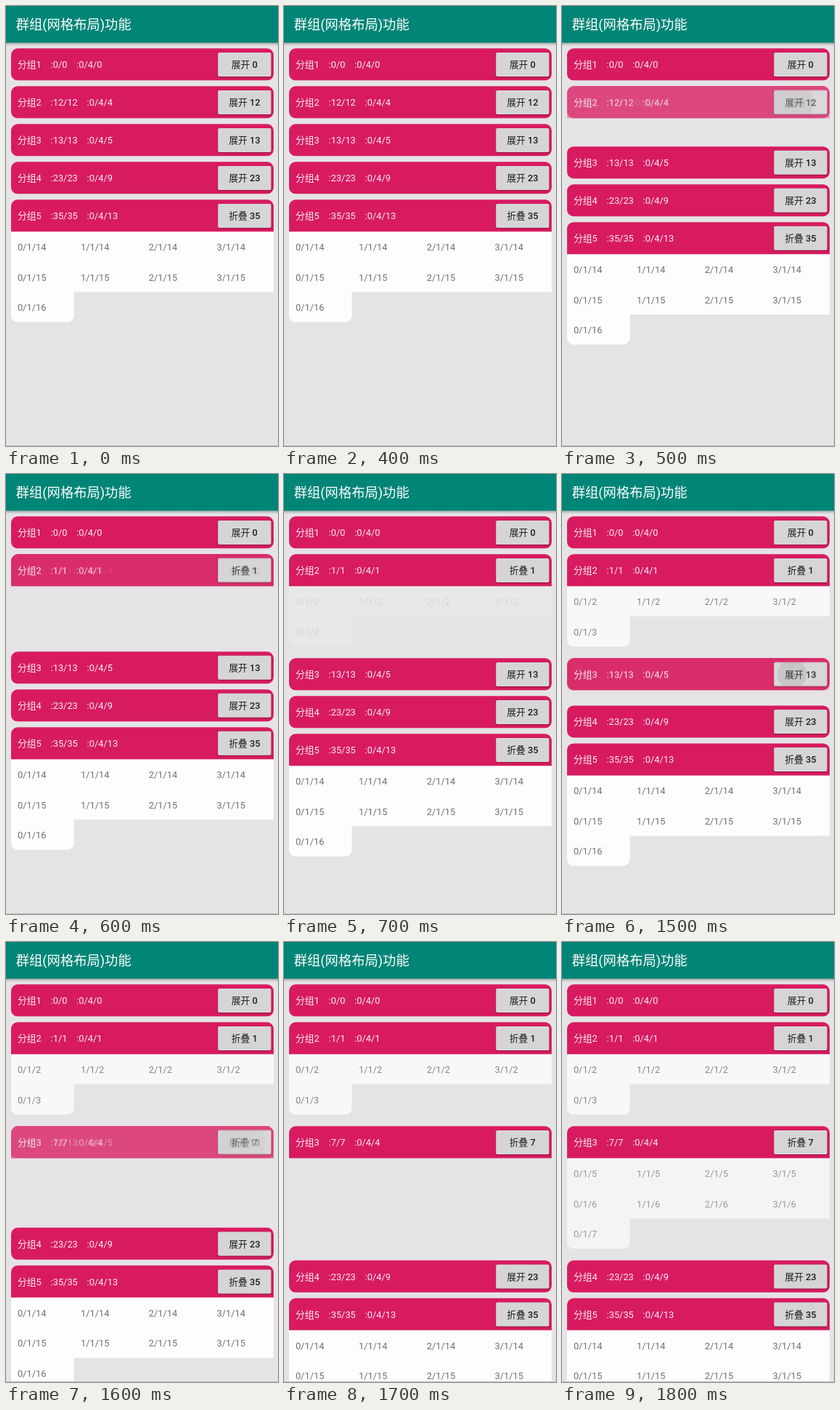
Write an HTML page with a canvas that moves like this. It is 375 by 605 pixels and loops after 2.1 s.

```html
<!DOCTYPE html>
<html lang="zh-CN">
<head>
<meta charset="utf-8">
<title>群组</title>
<style>
  html, body { margin: 0; width: 100%; height: 100%; overflow: hidden; background: #e5e3e5; }
  canvas { display: block; width: 375px; height: 605px; }
</style>
</head>
<body>
<canvas id="stage"></canvas>
<script>
const W = 375, H = 605, LOOP = 2100, STEP = 100;
const FONT = 'Roboto, "Noto Sans CJK SC", "Noto Sans CJK", sans-serif';
const LEFT = 7, RIGHT = 369, HEAD = 44, ROW = 41.5, PITCH = 52, RADIUS = 9;
const FIRST_TOP = 58.3, TEXT_SIZE = 12.85;
const BG = '#e5e3e5', PINK = '#d81b60', CELL = '#fdfdfd';

// Moves and cross-fades take 250 ms, new rows then fade in.
const MOVE = 250, FADE_DELAY = 265, FADE = 120, FADE_MAX = 0.84;
const OPEN_A = 401, OPEN_B = 1449;

const scale = window.devicePixelRatio || 1;

function makeContext(canvas, w, h) {
  canvas.width = Math.round(w * scale);
  canvas.height = Math.round(h * scale);
  const c = canvas.getContext('2d');
  c.scale(scale, scale);
  return c;
}

const ctx = makeContext(document.getElementById('stage'), W, H);
const layer = makeContext(document.createElement('canvas'), W, HEAD + 2);

function ease(x) {
  const p = Math.min(1, Math.max(0, x));
  return 0.5 - Math.cos(p * Math.PI) / 2;
}

function box(c, x, y, w, h, radii, fill) {
  c.beginPath();
  c.roundRect(x, y, w, h, radii);
  c.fillStyle = fill;
  c.fill();
}

function text(c, str, x, y, size, fill, weight = 400) {
  c.font = `${weight} ${size}px ${FONT}`;
  c.fillStyle = fill;
  c.fillText(str, x, y);
  return c.measureText(str).width;
}

function drawButton(c, y, word, count, rippleAge) {
  const x = 292.2, top = y + 5.6, w = 73.3, h = 33;
  c.save();
  c.shadowColor = 'rgba(0,0,0,0.35)';
  c.shadowBlur = 2 * scale;
  c.shadowOffsetY = scale;
  box(c, x, top, w, h, 2, '#d6d5d6');
  c.restore();
  if (rippleAge > 0) {
    c.save();
    c.beginPath();
    c.rect(x, top, w, h);
    c.clip();
    c.fillStyle = 'rgba(0,0,0,0.08)';
    c.beginPath();
    c.arc(317, y + 22, 10 + rippleAge * 0.2, 0, Math.PI * 2);
    c.fill();
    c.restore();
  }
  const size = 12.8, number = ' ' + count, ink = '#1e1e1e';
  c.font = `400 ${size}px ${FONT}`;
  const wordWidth = c.measureText(word).width;
  c.font = `500 ${size}px ${FONT}`;
  const start = x + (w - wordWidth - c.measureText(number).width) / 2;
  text(c, word, start, y + 27, size, ink);
  text(c, number, start + wordWidth, y + 27, size, ink, 500);
}

function drawHeader(c, y, name, count, range, open, rippleAge = 0) {
  const radii = open ? [RADIUS, RADIUS, 0, 0] : RADIUS;
  box(c, LEFT, y, RIGHT - LEFT, HEAD, radii, PINK);
  const label = `${name}    :${count}/${count}    :${range}`;
  text(c, label, 15.9, y + 26.9, TEXT_SIZE, '#fbeef3');
  drawButton(c, y, open ? '折叠' : '展开', count, rippleAge);
}

function fadedHeader(y, alpha, ...args) {
  if (alpha <= 0) return;
  layer.clearRect(0, 0, W, HEAD + 2);
  drawHeader(layer, 0, ...args);
  ctx.globalAlpha = alpha;
  ctx.drawImage(layer.canvas, 0, y, W, HEAD + 2);
  ctx.globalAlpha = 1;
}

// The closed header lies over the open one while they cross-fade.
function swapHeader(y, p, name, before, after, age) {
  if (p === 0) return drawHeader(ctx, y, name, ...before, false);
  if (p === 1) return drawHeader(ctx, y, name, ...after, true);
  fadedHeader(y, p, name, ...after, true);
  fadedHeader(y, 1 - p, name, ...before, false, age);
}

// Full rows of four cells, then one last cell.
function drawRows(y, first, fullRows, alpha = 1) {
  if (alpha <= 0) return;
  ctx.globalAlpha = alpha;
  const bodyHeight = fullRows * ROW;
  ctx.beginPath();
  ctx.rect(LEFT, y, RIGHT - LEFT, bodyHeight);
  ctx.roundRect(LEFT, y + bodyHeight, 86.6, ROW, [0, 0, RADIUS, RADIUS]);
  ctx.fillStyle = CELL;
  ctx.fill();
  for (let r = 0; r <= fullRows; r++) {
    const columns = r < fullRows ? 4 : 1;
    for (let col = 0; col < columns; col++) {
      const x = col ? col * W / 4 + 9.2 : 15.9;
      text(ctx, `${col}/1/${first + r}`, x, y + r * ROW + 26, TEXT_SIZE, '#707070');
    }
  }
  ctx.globalAlpha = 1;
}

function drawBar() {
  const shade = ctx.createLinearGradient(0, 50, 0, 55);
  shade.addColorStop(0, 'rgba(0,0,0,0.28)');
  shade.addColorStop(1, 'rgba(0,0,0,0)');
  ctx.fillStyle = shade;
  ctx.fillRect(0, 50, W, 5);
  ctx.fillStyle = '#008577';
  ctx.fillRect(0, 0, W, 50.5);
  text(ctx, '群组(网格布局)功能', 13.8, 31.8, 18.3, '#ffffff');
}

function rowAlpha(t, start) {
  return FADE_MAX * ease((t - start - FADE_DELAY) / FADE);
}

function draw(t) {
  const a = ease((t - OPEN_A) / MOVE), b = ease((t - OPEN_B) / MOVE);
  const shiftA = a * (2 * ROW + 8), shiftB = b * (3 * ROW + 8);
  const top = i => FIRST_TOP + i * PITCH + (i > 1 ? shiftA : 0) + (i > 2 ? shiftB : 0);

  ctx.fillStyle = BG;
  ctx.fillRect(0, 0, W, H);

  drawRows(top(1) + HEAD, 2, 1, rowAlpha(t, OPEN_A));
  drawRows(top(2) + HEAD, 5, 2, rowAlpha(t, OPEN_B));
  drawRows(top(4) + HEAD, 14, 2);

  drawHeader(ctx, top(0), '分组1', 0, '0/4/0', false);
  swapHeader(top(1), a, '分组2', [12, '0/4/4'], [1, '0/4/1'], t - OPEN_A);
  swapHeader(top(2), b, '分组3', [13, '0/4/5'], [7, '0/4/4'], t - OPEN_B);
  drawHeader(ctx, top(3), '分组4', 23, '0/4/9', false);
  drawHeader(ctx, top(4), '分组5', 35, '0/4/13', true);

  drawBar();
  ctx.fillStyle = '#c6c3c6';
  ctx.fillRect(0, H - 1, W, 1);
}

const begin = performance.now();
function tick() {
  const t = (performance.now() - begin) % LOOP;
  draw(Math.floor(t / STEP) * STEP);
  requestAnimationFrame(tick);
}
tick();
</script>
</body>
</html>
```
